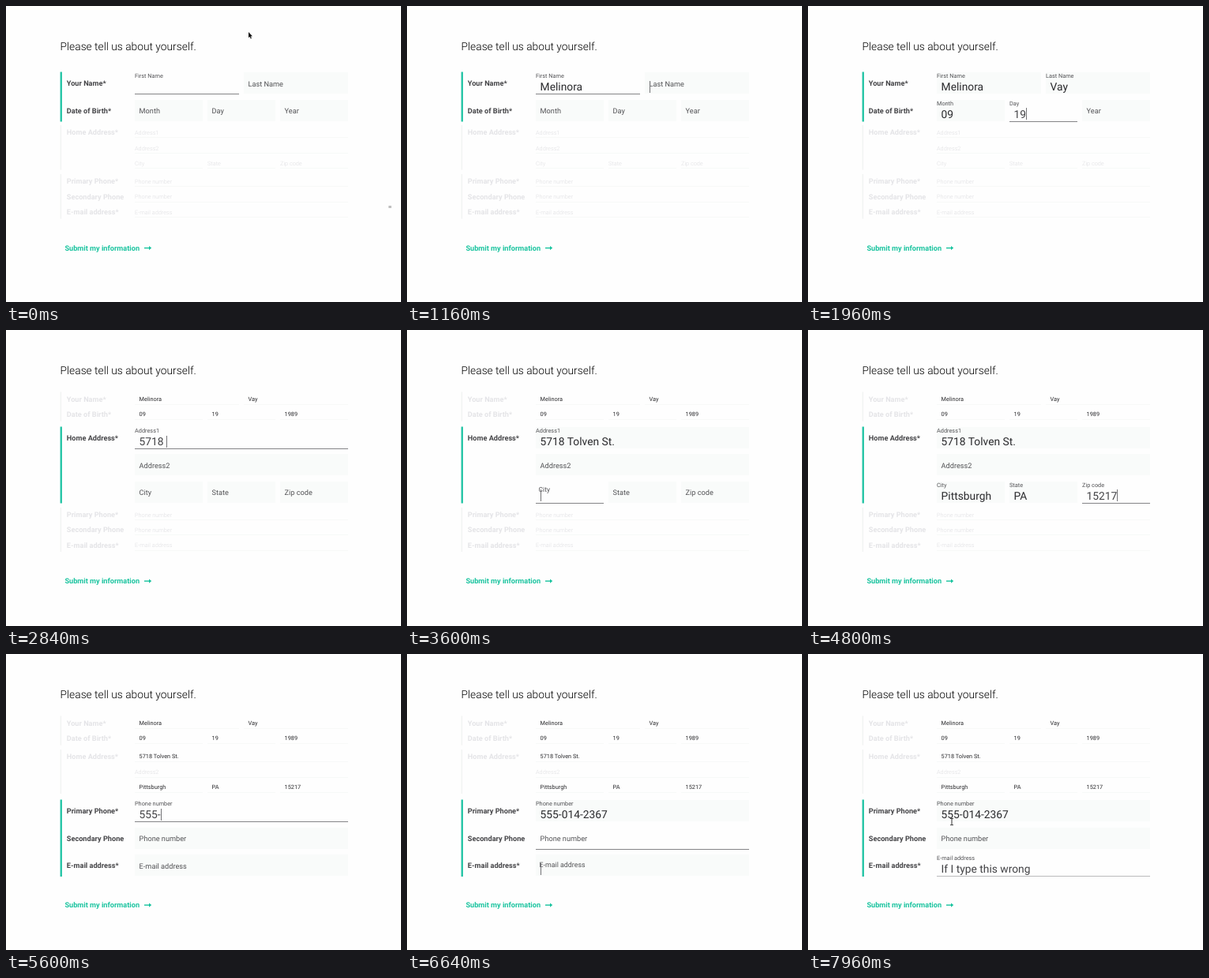
Write an HTML page with a canvas that moves like this. It is 500 by 375 pixels and loops after 8000 ms.

```html
<!DOCTYPE html>
<html lang="en">
<head>
<meta charset="utf-8">
<title>Form</title>
<style>
html, body { margin: 0; width: 100%; height: 100%; overflow: hidden; background: #fefefe; }
canvas { display: block; }
</style>
</head>
<body>
<canvas id="stage" width="500" height="375"></canvas>
<script>
const ctx = document.getElementById('stage').getContext('2d');
ctx.textRendering = 'geometricPrecision';
const LOOP = 8000;
const BIG = 13.8, MID = 9.18, SMALL = 7.34;
const LEFT = 163, RIGHT = 433, PAD = 5.6;

// Row centres for each open section.
const ROW_Y = [
  [98, 132.5, 160, 180, 199, 222, 241.5, 261],
  [87.5, 107, 137, 171, 205.5, 234, 253, 272.5],
  [87.5, 107, 130, 149.5, 168.5, 199, 233.5, 268]
];
const SUBMIT_Y = [306.5, 318, 318];
const SECTIONS = [[0, 1], [2, 4], [5, 7]];
const ROW_LABELS = ['Your Name*', 'Date of Birth*', 'Home Address*', '', '',
  'Primary Phone*', 'Secondary Phone', 'E-mail address*'];

// Each typed chunk: text, time of first key, time of last key.
const field = (row, col, cols, label, focus, ...chunks) => ({ row, col, cols, label, focus, chunks });
const fields = [
  field(0, 0, 2, 'First Name', -700, ['Melinora', 120, 950]),
  field(0, 1, 2, 'Last Name', 1160, ['Vay', 1240, 1400]),
  field(1, 0, 3, 'Month', 1470, ['09', 1550, 1630]),
  field(1, 1, 3, 'Day', 1710, ['19', 1830, 1910]),
  field(1, 2, 3, 'Year', 1990, ['1989', 2060, 2220]),
  field(2, 0, 1, 'Address1', 2260, ['5718 ', 2550, 2800], ['Tolven St.', 2920, 3350]),
  field(3, 0, 1, 'Address2', 3400),
  field(4, 0, 3, 'City', 3540, ['Pittsburgh', 3640, 4080]),
  field(4, 1, 3, 'State', 4220, ['PA', 4310, 4390]),
  field(4, 2, 3, 'Zip code', 4440, ['15217', 4520, 4790]),
  field(5, 0, 1, 'Phone number', 4960, ['555-', 5280, 5580], ['014-2367', 5840, 6390]),
  field(6, 0, 1, 'Phone number', 6440),
  field(7, 0, 1, 'E-mail address', 6600, ['If I type this wrong', 6690, 7450])
];
fields.forEach((f, i) => {
  const gap = 6;
  f.w = (RIGHT - LEFT - gap * (f.cols - 1)) / f.cols;
  f.x = LEFT + f.col * (f.w + gap);
  f.blur = i + 1 < fields.length ? fields[i + 1].focus : Infinity;
  f.section = SECTIONS.findIndex(([, last]) => f.row <= last);
});

const lerp = (a, b, k) => a + (b - a) * k;
const clamp = v => Math.max(0, Math.min(1, v));
const ease = (t, start, length) => {
  const k = clamp((t - start) / length);
  return k * k * (3 - 2 * k);
};
const grey = (v, alpha = 1) => `rgba(${v},${v},${v + 3},${alpha})`;
const between = (list, p) => {
  const i = Math.min(1, Math.floor(p));
  return lerp(list[i], list[i + 1], p - i);
};

function text(str, x, y, size, weight, color) {
  ctx.font = `${weight} ${size}px Roboto, sans-serif`;
  ctx.fillStyle = color;
  ctx.fillText(str, x, y + size * 0.355);
}

function rect(x, y, w, h, color) {
  ctx.fillStyle = color;
  ctx.fillRect(x, y, w, h);
}

function path(points, closed) {
  ctx.beginPath();
  points.forEach(([x, y]) => ctx.lineTo(x, y));
  if (closed) ctx.closePath();
}

function typed(f, t) {
  let value = '', lastKey = f.focus;
  for (const [str, first, last] of f.chunks) {
    const step = (last - first) / (str.length - 1);
    const count = t < first ? 0 : Math.min(str.length, Math.floor((t - first) / step + 1e-6) + 1);
    value += str.slice(0, count);
    if (count) lastKey = first + (count - 1) * step;
  }
  return { value, lastKey };
}

function drawField(f, t, p, open) {
  const y = between(ROW_Y.map(rows => rows[f.row]), p);
  const { value, lastKey } = typed(f, t);
  const lag = 60;
  const lit = t >= f.focus + lag && t < f.blur + lag;
  const base = Math.round(y + 13);

  if (open < 1) rect(f.x, Math.round(y + 6), f.w, 1, `rgba(247,249,248,${1 - open})`);
  if (!lit) rect(f.x, base - 27, f.w, 27, `rgba(249,251,250,${open})`);
  else rect(f.x, base, f.w, 1, grey(132, open * lerp(1, 0.55, ease(t, 7600, 200))));

  const raised = f.chunks.length ? ease(t, f.focus, 150) : 0;
  const labelX = f.x + PAD * (1 - raised) * open;
  const labelY = y + lerp(0.4, -9.3, raised) * open;
  const labelSize = lerp(SMALL, lerp(MID, SMALL, raised), open);
  const ink = Math.round(lerp(222, 82, open));
  const showLabel = value ? open : 1;
  if (showLabel > 0) text(f.label, labelX, labelY, labelSize, open > 0.5 ? 400 : 300, grey(ink, showLabel));

  const size = lerp(SMALL, BIG, open);
  const valueInk = t < f.blur ? 66 : 42;
  if (value) text(value, f.x + PAD, y + lerp(-0.5, 4.2, open), size, 400, grey(valueInk));

  const blinkOn = (t - lastKey) % 1000 < 500;
  if (t >= f.focus && t < f.blur && blinkOn && open > 0.9) {
    ctx.font = `400 ${size}px Roboto, sans-serif`;
    rect(Math.round(f.x + PAD + ctx.measureText(value).width), Math.round(y - 3.5), 1, 15, grey(115));
  }
}

function drawSection(s, p, open) {
  const [first, last] = SECTIONS[s].map(row => between(ROW_Y.map(rows => rows[row]), p));
  const half = lerp(9, 14.5, open);
  const tint = [[242, 30], [244, 195], [243, 163]].map(([a, b]) => Math.round(lerp(a, b, open)));
  rect(68.6, first - half, lerp(1.6, 2.3, open), last - first + half * 2 - 0.5, `rgb(${tint})`);
  for (let row = SECTIONS[s][0]; row <= SECTIONS[s][1]; row++) {
    const y = between(ROW_Y.map(rows => rows[row]), p);
    text(ROW_LABELS[row], 76.8, y, MID, 700, grey(Math.round(lerp(228, 68, open))));
  }
}

function drawSubmit(y) {
  const green = '#18c39e';
  text('Submit my information', 74.4, y, MID, 700, green);
  rect(175, y - 0.6, 7, 1.4, green);
  path([[181, y - 2.5], [184.2, y + 0.1], [181, y + 2.7]], true);
  ctx.fill();
}

function drawArrow(x, y) {
  ctx.save();
  ctx.translate(x, y);
  path([[0, 0], [0, 7.2], [1.6, 5.8], [2.7, 8.4], [3.9, 7.9], [2.8, 5.4], [4.9, 5.3]], true);
  ctx.strokeStyle = '#fff';
  ctx.lineWidth = 1.2;
  ctx.stroke();
  ctx.fillStyle = '#111';
  ctx.fill();
  ctx.restore();
}

function drawBeam(x, y) {
  rect(x - 0.5, y - 4, 1, 8, '#333');
  for (const end of [-4.5, 3.7]) rect(x - 2, y + end, 4, 0.9, '#333');
}

function drawPointer(t) {
  if (t < 120) return drawArrow(307, 33);
  if (t < 7600) return;
  const k = ease(t, 7640, 260);
  const x = lerp(307, 182, k), y = lerp(35, 212.5, k);
  (y > 185 ? drawBeam : drawArrow)(x, y);
}

function draw(t) {
  const p = ease(t, 2260, 140) + ease(t, 4960, 160);
  const open = SECTIONS.map((_, s) => Math.max(0, 1 - Math.abs(p - s)));
  rect(0, 0, 500, 375, '#fefefe');
  text('Please tell us about yourself.', 68.5, 51, BIG, 300, '#000');
  SECTIONS.forEach((_, s) => drawSection(s, p, open[s]));
  fields.forEach(f => drawField(f, t, p, open[f.section]));
  drawSubmit(between(SUBMIT_Y, p));
  if (t < 40) rect(484.3, 253, 3.5, 3, '#bdbdbd');
  drawPointer(t);
}

const start = performance.now();
function tick() {
  draw((performance.now() - start) % LOOP);
  requestAnimationFrame(tick);
}
tick();
</script>
</body>
</html>
```
